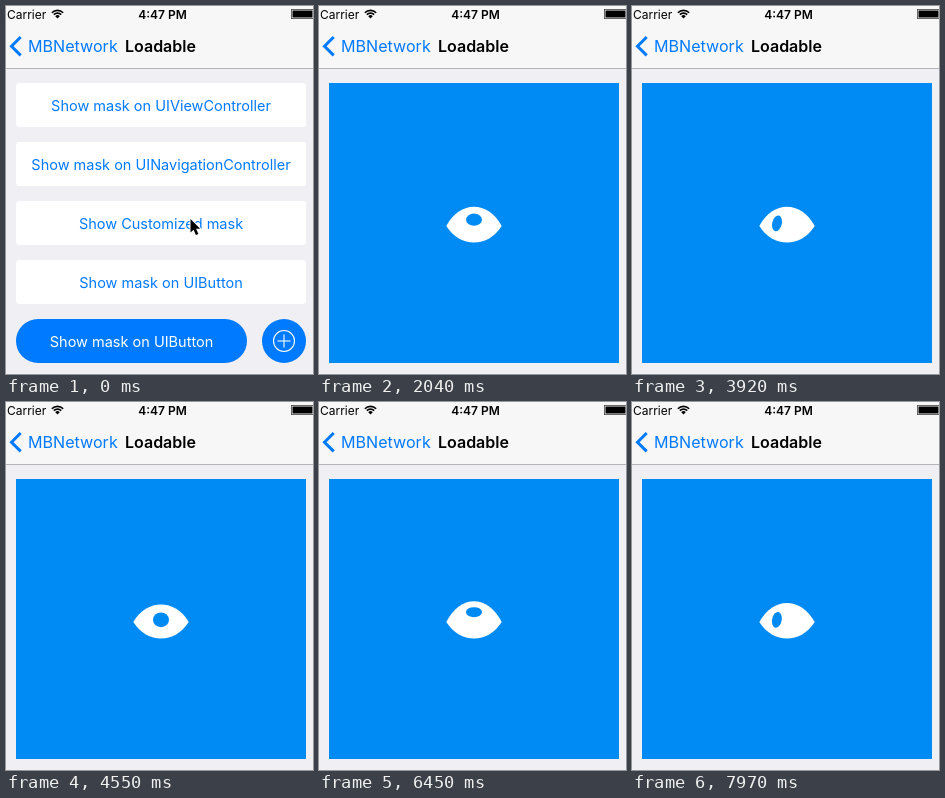
An HTML page with a canvas that plays this animation: 307x368 px, repeating every 8000 ms.

```html
<!DOCTYPE html>
<html lang="en">
<head>
<meta charset="utf-8">
<title>Loadable</title>
<style>
html, body { margin: 0; width: 100%; height: 100%; overflow: hidden; background: #efeff4; }
canvas { display: block; width: 307px; height: 368px; }
</style>
</head>
<body>
<canvas id="stage"></canvas>
<script>
const W = 307, H = 368, LOOP = 8000;
const BLUE = '#007aff', MASK = '#008af3';
const canvas = document.getElementById('stage');
const ctx = canvas.getContext('2d');
const dpr = window.devicePixelRatio || 1;
canvas.width = W * dpr;
canvas.height = H * dpr;

const clamp = x => Math.max(0, Math.min(1, x));

// cubic-bezier(.25, .1, .25, 1)
function ease(x) {
  x = clamp(x);
  let lo = 0, hi = 1;
  for (let i = 0; i < 24; i++) {
    const m = (lo + hi) / 2, n = 1 - m;
    if (0.75 * n * m + m * m * m < x) lo = m; else hi = m;
  }
  const u = 1 - lo;
  return 0.3 * u * u * lo + 3 * u * lo * lo + lo * lo * lo;
}

function text(str, x, y, size, color, weight = 400, align = 'left') {
  ctx.font = `${weight} ${size}px Inter, "Liberation Sans", sans-serif`;
  ctx.textAlign = align;
  ctx.fillStyle = color;
  ctx.fillText(str, x, y);
}

function box(x, y, w, h, r, color) {
  ctx.fillStyle = color;
  ctx.beginPath();
  ctx.roundRect(x, y, w, h, r);
  ctx.fill();
}

function line(points, color, width) {
  ctx.strokeStyle = color;
  ctx.lineWidth = width;
  ctx.beginPath();
  points.forEach(([x, y]) => ctx.lineTo(x, y));
  ctx.stroke();
}

function drawBars() {
  ctx.fillStyle = '#f7f7f8';
  ctx.fillRect(0, 0, W, 62);
  ctx.fillStyle = '#b5b5b8';
  ctx.fillRect(0, 62, W, 1);

  text('Carrier', 1, 12.5, 12, '#000');
  text('4:47 PM', 156.5, 12.5, 12, '#000', 600, 'center');

  // Wi-Fi
  const from = -Math.PI * 0.75, to = -Math.PI * 0.25;
  ctx.strokeStyle = ctx.fillStyle = '#000';
  ctx.lineWidth = 1.7;
  for (const r of [8, 5.2]) {
    ctx.beginPath();
    ctx.arc(51.5, 12.4, r, from, to);
    ctx.stroke();
  }
  ctx.beginPath();
  ctx.moveTo(51.5, 12.6);
  ctx.arc(51.5, 12.4, 3.2, from, to);
  ctx.fill();

  // Battery
  ctx.lineWidth = 0.8;
  ctx.strokeStyle = '#444';
  ctx.strokeRect(285.4, 3.4, 22, 9.2);
  ctx.fillStyle = '#000';
  ctx.fillRect(286.5, 4.5, 20, 7);

  line([[14.7, 31], [5.5, 40.2], [14.7, 49.4]], BLUE, 3);
  text('MBNetwork', 22, 46, 16.1, BLUE);
  text('Loadable', 119, 46, 16, '#000', 600);
}

function drawButtons(pressed) {
  const titles = ['UIViewController', 'UINavigationController', '', 'UIButton'];
  titles.forEach((name, i) => {
    const y = 77 + 59 * i;
    box(10, y, 290, 44, 3, '#fff');
    const title = name ? 'Show mask on ' + name : 'Show Customized mask';
    ctx.globalAlpha = pressed && !name ? 0.2 : 1;
    text(title, 155, y + 27.5, 14.5, BLUE, 400, 'center');
    ctx.globalAlpha = 1;
  });

  box(10, 313, 231, 44, 22, BLUE);
  text('Show mask on UIButton', 125.5, 340.5, 14.5, '#fff', 400, 'center');

  box(256, 313, 44, 44, 22, BLUE);
  ctx.strokeStyle = '#fff';
  ctx.lineWidth = 1.1;
  ctx.beginPath();
  ctx.arc(278, 335, 10.5, 0, 7);
  ctx.stroke();
  line([[271.5, 335], [284.5, 335]], '#fff', 1.1);
  line([[278, 328.5], [278, 341.5]], '#fff', 1.1);
}

// Look up, roll once clockwise, return to the middle
function gaze(t) {
  const out = ease(t / 1000) - ease((t - 2550) / 600);
  const turn = clamp((t - 1000) / 1550);
  return { out, angle: (turn * 2 - 0.5) * Math.PI, lift: out * Math.abs(1 - 2 * turn) };
}

function drawEye(t) {
  const { out, angle, lift } = gaze(t);
  const cx = 155, cy = 220, half = 27.7, top = 22 + 6.2 * lift;
  ctx.fillStyle = '#fff';
  ctx.beginPath();
  ctx.moveTo(cx - half, cy);
  ctx.bezierCurveTo(cx - 14, cy - top, cx + 14, cy - top, cx + half, cy);
  ctx.bezierCurveTo(cx + 14, cy + 22, cx - 14, cy + 22, cx - half, cy);
  ctx.fill();

  const dist = 10.3 * out;
  ctx.fillStyle = MASK;
  ctx.beginPath();
  ctx.ellipse(cx + dist * Math.cos(angle), cy - 0.2 + dist * Math.sin(angle),
    8 * (1 - 0.4 * out), 8, angle, 0, Math.PI * 2);
  ctx.fill();
}

function drawCursor(x, y) {
  const shape = [[0, 0], [0, 13.5], [3.1, 10.7], [5.4, 16], [7.9, 14.9], [5.6, 9.7], [9.7, 9.7]];
  ctx.beginPath();
  shape.forEach(([dx, dy]) => ctx.lineTo(x + dx, y + dy));
  ctx.closePath();
  ctx.lineJoin = 'round';
  ctx.lineWidth = 1.8;
  ctx.strokeStyle = '#fff';
  ctx.stroke();
  ctx.fillStyle = '#000';
  ctx.fill();
  ctx.lineJoin = 'miter';
}

function draw(t) {
  ctx.setTransform(dpr, 0, 0, dpr, 0, 0);
  ctx.fillStyle = '#efeff4';
  ctx.fillRect(0, 0, W, H);
  drawBars();
  if (t < 660) {
    drawButtons(t >= 540);
  } else {
    box(10, 77, 290, 280, 0, MASK);
    drawEye(t < 1700 ? 0 : (t - 1700) % 4060);
  }
  if (t < 960) drawCursor(184.5, 213);
  else if (t < 1020) drawCursor(208, 214);
  else if (t < 1080) drawCursor(265.5, 216);
}

const start = performance.now();
function tick() {
  draw((performance.now() - start) % LOOP);
  requestAnimationFrame(tick);
}
tick();
</script>
</body>
</html>
```
